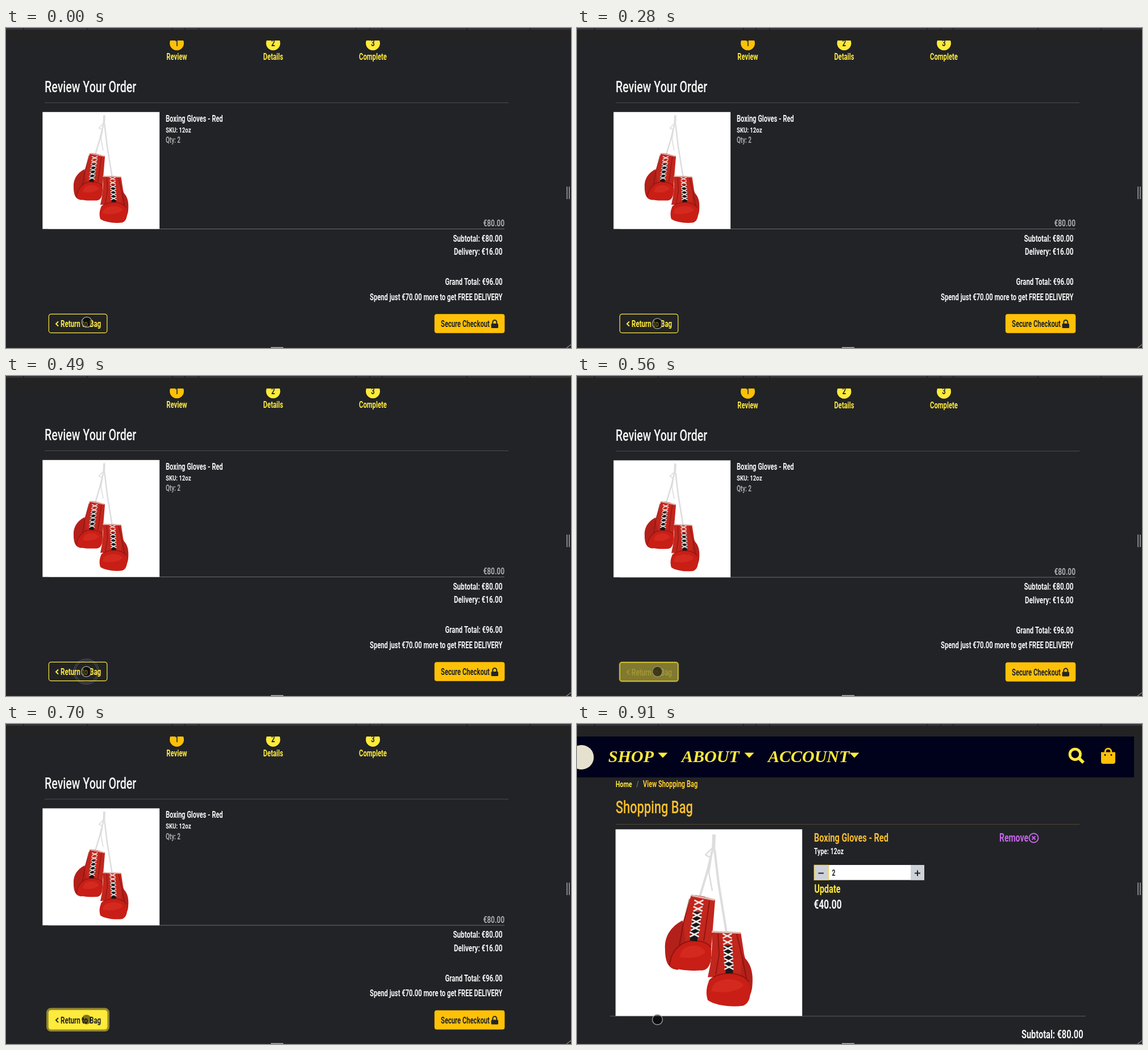
Write an HTML page with a canvas that moves like this. It is 994 by 563 pixels and loops after 1.4 s.

```html
<!DOCTYPE html>
<html lang="en">
<head>
<meta charset="utf-8">
<title>Checkout</title>
<style>
html, body { margin: 0; width: 100%; height: 100%; overflow: hidden; background: #222327; }
canvas { display: block; width: 994px; height: 563px; }
</style>
</head>
<body>
<canvas id="stage" width="994" height="563"></canvas>
<script>
const ctx = document.getElementById('stage').getContext('2d');
const LOOP = 1400, STEP = 70, NARROW = 0.7;
const PAGE = '#222327', YELLOW = '#ffeb3b', AMBER = '#ffc107', INK = '#212529', WHITE = '#f6f6f6', GREY = '#a9aaac';

function rect(x, y, w, h, color) {
  ctx.fillStyle = color;
  ctx.fillRect(x, y, w, h);
}

function box(x, y, w, h, r, fill, stroke) {
  ctx.beginPath();
  ctx.roundRect(x, y, w, h, r);
  if (fill) { ctx.fillStyle = fill; ctx.fill(); }
  if (stroke) { ctx.strokeStyle = stroke; ctx.lineWidth = 1.2; ctx.stroke(); }
}

function disc(x, y, r, fill) {
  ctx.fillStyle = fill;
  ctx.beginPath();
  ctx.arc(x, y, r, 0, 7);
  ctx.fill();
}

function ring(x, y, r, width, color) {
  ctx.strokeStyle = color;
  ctx.lineWidth = width;
  ctx.beginPath();
  ctx.arc(x, y, r, 0, 7);
  ctx.stroke();
}

function line(points, width, color) {
  ctx.strokeStyle = color;
  ctx.lineWidth = width;
  ctx.beginPath();
  points.forEach(([x, y]) => ctx.lineTo(x, y));
  ctx.stroke();
}

function shape(d, fill) {
  ctx.fillStyle = fill;
  ctx.fill(new Path2D(d));
}

function crease(d) {
  ctx.strokeStyle = 'rgba(110,10,8,.55)';
  ctx.lineWidth = 2;
  ctx.stroke(new Path2D(d));
}

// Condensed sans face used for the whole page
function text(str, x, y, size, color, align = 'left', weight = 600) {
  ctx.save();
  ctx.translate(x, y);
  ctx.scale(NARROW, 1);
  ctx.font = `${weight} ${size}px Roboto, "Open Sans", sans-serif`;
  ctx.textAlign = align;
  ctx.fillStyle = color;
  ctx.fillText(str, 0, 0);
  const width = ctx.measureText(str).width * NARROW;
  ctx.restore();
  return width;
}

function mix(a, b, k) {
  return `rgb(${a.map((v, i) => Math.round(v + (b[i] - v) * k))})`;
}

function laces(x0, y0, x1, y1) {
  const at = k => [x0 + (x1 - x0) * k, y0 + (y1 - y0) * k];
  line([at(0.3), at(1)], 13, '#1a1718');
  for (let i = 0; i < 6; i++) {
    const [x, y] = at((i + 0.4) / 6.4);
    line([[x - 8, y - 4], [x + 8, y + 4]], 2.6, '#ece6e4');
    line([[x + 8, y - 4], [x - 8, y + 4]], 2.6, '#ece6e4');
  }
}

function gloves(x, y, size) {
  ctx.save();
  rect(x, y, size, size, '#fff');
  ctx.translate(x, y);
  ctx.scale(size / 328, size / 328);
  ctx.lineJoin = 'round';
  const cord = '#dddddf';
  line([[173, 9], [172, 38]], 6, cord);
  line([[173, 30], [158, 45], [168, 50], [164, 76], [170, 108]], 2.5, cord);
  line([[170, 38], [161, 75], [147, 122]], 4, cord);
  line([[174, 36], [181, 95], [195, 182]], 4, cord);

  shape('M133 115Q153 116 175 124L168 210L108 208L118 165Z', '#c2261d');
  shape('M118 160C95 172 86 190 87 210C87 232 92 246 110 247L126 220Z', '#b3201a');
  shape('M112 205C125 192 158 193 168 208C170 230 166 249 150 248C128 249 105 248 95 238C96 222 103 212 112 205Z', '#c81e16');
  shape('M118 211C132 200 154 204 158 216C148 226 126 228 112 224Z', '#d3291f');
  crease('M130 122L119 166L112 205C125 192 158 193 168 208M165 126L155 196M112 205Q98 215 95 238');
  laces(147, 124, 137, 196);

  shape('M169 179L220 181L226 220L236 258L162 260Q172 220 169 179Z', '#c2261d');
  shape('M222 222C237 233 243 250 240 278C237 298 228 302 218 300Z', '#b3201a');
  shape('M164 267C176 249 222 248 234 268C239 286 238 304 224 310C202 313 174 309 162 300C158 288 160 276 164 267Z', '#c81e16');
  shape('M171 274C184 260 216 260 225 274C215 287 184 288 168 284Z', '#d3291f');
  crease('M180 183L182 220L176 255M213 184L222 222L230 262M164 267C176 249 222 248 234 268');
  line([[169, 180], [220, 182]], 3, '#dfb9b3');
  line([[133, 116], [174, 124]], 3, '#dfb9b3');
  laces(196, 183, 200, 253);
  ctx.restore();
}

function windowFrame() {
  rect(0, 0, 994, 22, '#232324');
  rect(0, 0, 994, 3, '#34363b');
  for (const x of [30, 142, 292, 314, 338, 615, 639, 661, 810, 921]) rect(x, 0, 1.5, 3, '#1c1d20');
  rect(0, 561.5, 994, 1.5, '#33202b');
  rect(466, 561.5, 22, 1.5, '#b5b5b8');
  rect(986, 279, 2, 22, '#85868a');
  rect(990, 279, 2, 22, '#85868a');
  line([[986, 563], [994, 557]], 1.2, '#8b8b8e');
}

function returnButton(k) {
  const yellow = [255, 235, 59], dark = [34, 35, 39];
  if (k > 0) {
    const s = 4 * k;
    box(75 - s, 503 - s, 103 + 2 * s, 33.5 + 2 * s, 4 + s, `rgba(255,235,59,${0.5 * k})`);
  }
  box(75.3, 503.3, 102.5, 33, 4, mix(dark, yellow, k), YELLOW);
  const ink = mix(yellow, [33, 37, 41], k);
  line([[92, 516.5], [88, 520.5], [92, 524.5]], 2, ink);
  text('Return to Bag', 96, 526, 16.6, ink);
}

function lock(x, y) {
  box(x, y + 7, 12.5, 8, 1.5, INK);
  ctx.strokeStyle = INK;
  ctx.lineWidth = 2;
  ctx.beginPath();
  ctx.moveTo(x + 2.8, y + 8);
  ctx.arc(x + 6.25, y + 4.5, 3.5, Math.PI, 0);
  ctx.lineTo(x + 9.75, y + 8);
  ctx.stroke();
}

function orderPage(k, shift) {
  ctx.save();
  ctx.translate(0, shift);
  [['Review', 300.5, AMBER], ['Details', 470, YELLOW], ['Complete', 645.5, YELLOW]].forEach(([label, x, color], i) => {
    disc(x, 27.2, 13.4, 'rgba(0,0,0,.25)');
    disc(x, 26.8, 12.5, color);
    text(i + 1, x, 31.5, 16, INK, 'center');
    text(label, x, 56, 16.1, YELLOW, 'center');
  });
  text('Review Your Order', 68, 113, 28, WHITE, 'left', 500);
  rect(68, 131, 816, 1, '#4c4d50');
  rect(75, 353, 802, 1, '#6b6c6f');
  gloves(64.3, 147.8, 205.8);

  text('Boxing Gloves - Red', 281, 164.5, 15.9, WHITE);
  text('SKU: 12oz', 281, 183.5, 13.7, WHITE);
  text('Qty: 2', 281, 202, 14.1, GREY);
  text('€80.00', 877, 349, 17, GREY, 'right');
  text('Subtotal: €80.00', 873.5, 375.5, 16.7, WHITE, 'right');
  text('Delivery: €16.00', 873.5, 399, 16.7, WHITE, 'right');
  text('Grand Total: €96.00', 873.5, 452, 16.3, WHITE, 'right');
  const free = text('FREE DELIVERY', 873.5, 478.5, 15.9, WHITE, 'right', 700);
  text('Spend just €70.00 more to get ', 873.5 - free, 478.5, 16, WHITE, 'right');

  returnButton(k);
  box(753.8, 503.2, 123.5, 33.6, 4, AMBER);
  text('Secure Checkout', 765, 526, 16, INK);
  lock(853.5, 513);
  ctx.restore();
}

function navBar() {
  rect(0, 22, 980, 72, '#00021c');
  disc(8, 58.5, 21.5, '#e6e1cf');
  ctx.font = 'italic bold 30px "Liberation Serif", "Noto Serif", serif';
  ctx.textAlign = 'left';
  for (const [label, x, caret] of [['SHOP', 55, 143], ['ABOUT', 184, 295], ['ACCOUNT', 336, 480]]) {
    ctx.fillStyle = YELLOW;
    ctx.fillText(label, x, 67);
    shape(`M${caret - 0.5} 50.5h17l-8.5 9Z`, YELLOW);
  }
  ring(876.3, 53.3, 9.2, 4.8, YELLOW);
  line([[883, 60], [891, 68]], 5.5, YELLOW);
  box(922, 49.5, 25, 20.5, [0, 0, 4, 4], AMBER);
  ctx.strokeStyle = AMBER;
  ctx.lineWidth = 3;
  ctx.beginPath();
  ctx.moveTo(929, 52);
  ctx.arc(934.5, 48.5, 5.3, Math.PI, 0);
  ctx.lineTo(940, 52);
  ctx.stroke();
  disc(929, 54.5, 1.4, '#00021c');
  disc(940, 54.5, 1.4, '#00021c');
}

function bagPage() {
  const gold = '#f9bf2d', violet = '#c366e6';
  navBar();
  text('Home', 68, 110.5, 15.3, YELLOW);
  text('/', 104.5, 110.5, 15.5, '#77797d');
  text('View Shopping Bag', 116, 110.5, 15.8, '#fdcb2e');
  text('Shopping Bag', 68, 157, 31.2, gold, 'left', 500);
  rect(68, 176, 816, 1, '#51472f');
  rect(58, 513.5, 837, 1, '#606164');
  gloves(67.8, 185.3, 328.4);

  text('Boxing Gloves - Red', 417, 207, 20.7, gold);
  text('Type: 12oz', 417, 229, 15.1, WHITE);
  rect(417, 248, 194, 26.5, '#fff');
  rect(587, 248, 24, 26.5, '#ced2d8');
  rect(417, 248, 26, 26.5, '#ced2d8');
  box(417.3, 248.3, 25.4, 26, 0, null, '#f5d548');
  line([[424.5, 262.5], [434, 262.5]], 2, INK);
  line([[594, 262.5], [604, 262.5]], 2, INK);
  line([[599, 257.5], [599, 267.5]], 2, INK);
  text('2', 448.5, 267, 15, INK);
  text('Update', 417.5, 297, 20.6, YELLOW);
  text('€40.00', 416.5, 324.5, 22.2, WHITE);
  text('Remove', 743, 207, 20, violet);
  ring(803.5, 200.5, 8, 2, violet);
  line([[800.5, 197.5], [806.5, 203.5]], 2, violet);
  line([[806.5, 197.5], [800.5, 203.5]], 2, violet);
  text('Subtotal: €80.00', 890.5, 553, 20.8, WHITE, 'right');
}

function pointer(t, k) {
  const settle = Math.min(t / 140, 1);
  const x = 142.3 - 0.8 * settle, y = 517.5 + 2.6 * settle;
  disc(x, y, 8.5, `rgba(0,0,0,${0.6 - 0.1 * k})`);
  ring(x, y, 9, 1.5, `rgba(175,175,178,${0.8 * (1 - k)})`);
  if (t >= 350 && t < 560) {
    const age = (t - 350) / STEP, r = [14, 18.6, 21][age];
    const alpha = [0.7, 0.8, 0.3][age];
    ring(x, y, r + 1.2, 1, `rgba(225,225,225,${alpha})`);
    ring(x, y, r - 1.4, 1, `rgba(225,225,225,${alpha})`);
  }
}

function draw(now) {
  const t = Math.floor((now % LOOP) / STEP) * STEP;
  const bag = t >= 910;
  const pressed = bag || t < 560 ? 0 : t < 630 ? 0.43 : t < 700 ? 0.9 : 1;
  rect(0, 0, 994, 563, PAGE);
  if (bag) bagPage();
  else orderPage(pressed, t >= 560 ? 0.6 : 0);
  windowFrame();
  pointer(t, pressed);
}

function tick() {
  draw(performance.now());
  requestAnimationFrame(tick);
}
tick();
</script>
</body>
</html>
```
